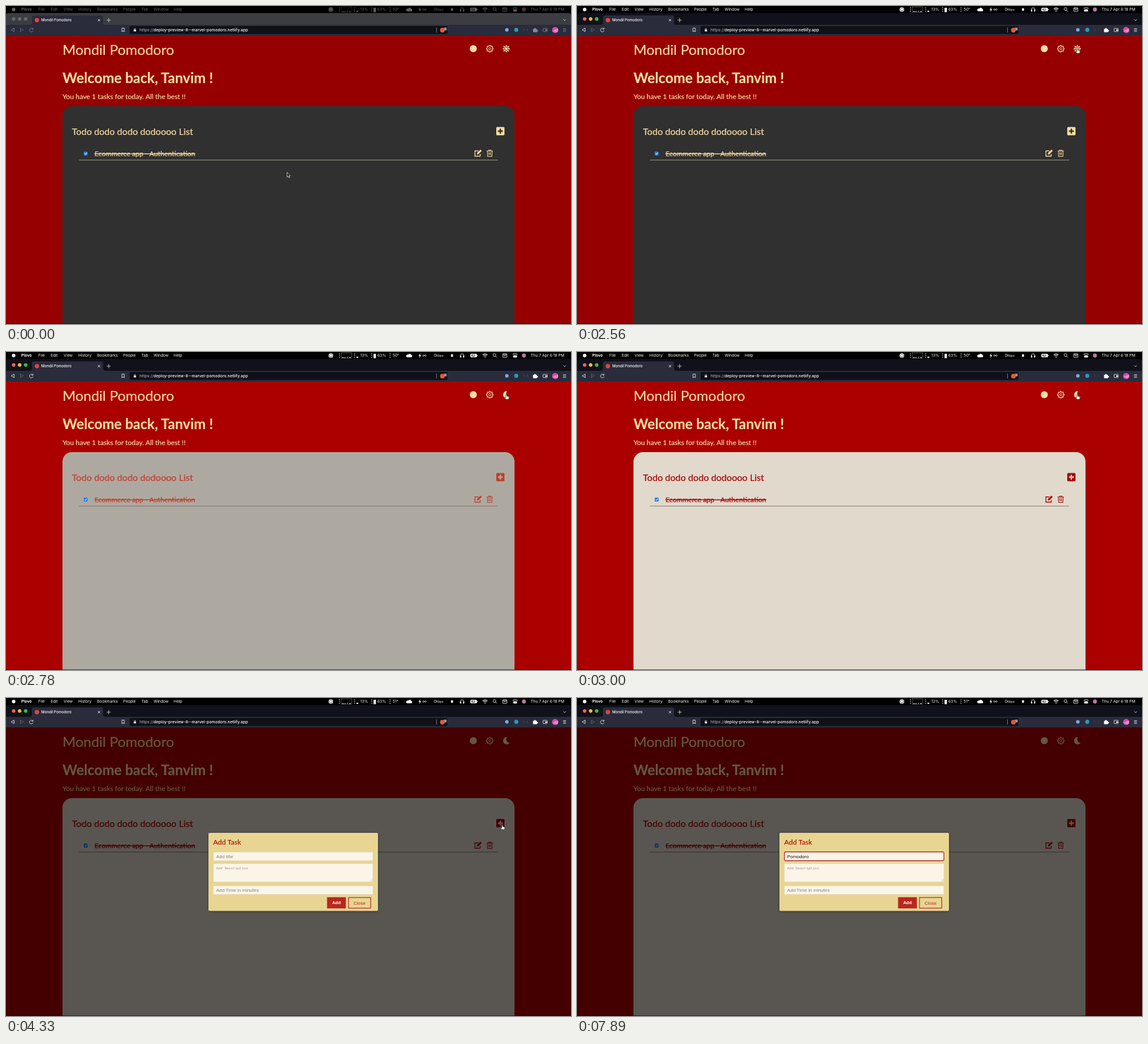
Recreate the animation shown at these times as an HTML page. Size 960 px wide and 540 px high, loop 8000 ms.

```html
<!DOCTYPE html>
<html lang="en">
<head>
<meta charset="utf-8">
<title>Todo list</title>
<style>
html, body { margin: 0; width: 100%; height: 100%; overflow: hidden; background: #000; }
svg { display: block; width: 100vw; height: 100vh; }
text { white-space: pre; }
.ui { font-family: Inter, sans-serif; }
.page { font-family: Lato, sans-serif; }
.form { font-family: "Liberation Sans", Arial, sans-serif; }
.gold { fill: #f8dca0; }
.goldline { fill: none; stroke: #f8dca0; }
.ink { fill: var(--ink); }
.inkline { fill: none; stroke: var(--ink); }
.gold text { stroke: #f8dca0; stroke-width: 0.2; }
text.ink { stroke: var(--ink); stroke-width: 0.2; }
</style>
</head>
<body>
<svg id="stage" viewBox="0 0 960 540"></svg>
<script>
const LOOP = 8000;
const stage = document.getElementById('stage');

// Markup helpers
const attrs = o => Object.entries(o).map(([k, v]) => ` ${k}="${v}"`).join('');
const text = (x, y, size, str, o = {}) =>
  `<text x="${x}" y="${y}" font-size="${size}"${attrs(o)}>${str}</text>`;
const rect = (x, y, width, height, o = {}) => `<rect${attrs({ x, y, width, height, ...o })}/>`;
const disc = (cx, cy, r, o = {}) => `<circle${attrs({ cx, cy, r, ...o })}/>`;
const path = (d, o = {}) => `<path${attrs({ d, ...o })}/>`;
const group = (body, o = {}) => `<g${attrs(o)}>${body}</g>`;
const line = { fill: 'none', stroke: '#fff', 'stroke-width': 0.8 };

function gear(cx, cy, outer, inner, teeth) {
  const pts = [];
  for (let i = 0; i < teeth; i++) {
    [[-0.34, inner], [-0.2, outer], [0.2, outer], [0.34, inner]].forEach(([off, r]) => {
      const a = (i + off) * 2 * Math.PI / teeth;
      pts.push(`${(cx + r * Math.sin(a)).toFixed(2)} ${(cy - r * Math.cos(a)).toFixed(2)}`);
    });
  }
  return 'M' + pts.join('L') + 'Z';
}

function menuBar() {
  const menus = [['File', 55], ['Edit', 76], ['View', 98], ['History', 123], ['Bookmarks', 155],
    ['People', 199], ['Tab', 230], ['Window', 251], ['Help', 285]];
  const meter = x => [2.5, 5.5, 8.5].map(y => rect(x, y, 1, 1.5)).join('');
  return disc(13, 6, 3) +
    text(26, 8.4, 6.6, 'Plovo', { 'font-weight': 700 }) +
    menus.map(([s, x]) => text(x, 8.4, 6.6, s)).join('') +
    disc(552, 6, 3.2, { ...line, 'stroke-width': 1.3 }) + disc(552, 6, 2.1) +
    meter(566) + rect(569.5, 1.5, 18, 9, { ...line, 'stroke-width': 0.5, opacity: 0.6 }) +
    path('M571 9.5h3m1 0h2m2-.5h2m2 .5h3', line) +
    meter(592) + rect(595.5, 8, 3, 2) + text(602, 8.4, 6.6, '12%', { id: 'cpu' }) +
    meter(621) + rect(624.5, 3, 4, 7.5) + text(631, 8.4, 6.6, '63%') +
    meter(652) + text(657, 8.4, 6.6, '50°', { id: 'temp' }) +
    path('M681.5 9h7a2 2 0 0 0 .3-3.9a3 3 0 0 0-5.6-.5a2.3 2.3 0 0 0-1.7 4.4z') +
    path('M704 2l-3 4.5h2l-1 3.8l3.6-4.8h-2.3z') +
    path('M711 6c-1.5-2.2-3-1.2-3 0s1.5 2.2 3 0s3-1.2 3 0s-1.5 2.2-3 0', line) +
    text(727, 8.2, 6.6, '0<tspan font-size="5">Kbps</tspan>') +
    rect(756, 4, 3.5, 4) +
    path('M772 8v-2a3 3 0 0 1 6 0v2', line) + rect(771.6, 6, 1.8, 3.5) + rect(776.6, 6, 1.8, 3.5) +
    rect(789, 3, 11, 6, { rx: 1.5 }) + rect(800.5, 5, 1, 2) +
    text(790.6, 8, 5, '62', { 'font-weight': 700, style: 'fill:#000' }) +
    path('M810 5a5.7 5.7 0 0 1 8 0M811.5 6.8a3.5 3.5 0 0 1 5 0', { ...line, 'stroke-width': 1.1 }) + disc(814, 8.6, 0.9) +
    disc(830, 5.2, 2.4, line) + path('M831.8 7l2.2 2.3', line) +
    rect(844, 2.8, 7, 6.5, { ...line, rx: 1 }) + path('M844 4.5h7M845.5 6.5h4', line) +
    rect(861.5, 2.8, 7, 2.7, { ...line, rx: 1.3 }) + rect(861.5, 6.5, 7, 2.7, { rx: 1.3 }) +
    disc(880, 6, 3.4, { fill: '#b878a8' }) +
    text(891.5, 8.4, 6.6, 'Thu 7 Apr 6:18 PM');
}

function browser() {
  const lights = ['#ff5f57', '#febc2e', '#28c840'];
  return rect(0, 12, 960, 40, { rx: 4, id: 'strip' }) +
    path('M40 32q4 0 4-4v-9q0-3 3-3h115q3 0 3 3v9q0 4 4 4z', { fill: '#2a2c3b' }) +
    rect(0, 32, 960, 18.5, { fill: '#2a2c3b' }) +
    group(lights.map((c, i) => disc(13 + i * 10.2, 22, 3, { fill: c })).join(''), { id: 'lights' }) +
    group(lights.map((c, i) => disc(13 + i * 10.2, 22, 3)).join(''), { id: 'greys', fill: '#66676c' }) +
    disc(52.5, 24, 3.7, { fill: '#e0443f' }) +
    text(60, 26.2, 6.1, 'Mondil Pomodoro', { fill: '#fff', 'font-weight': 500 }) +
    path('M156 22l4 4m0-4l-4 4', line) +
    path('M171 24h7m-3.5-3.5v7', { ...line, stroke: '#ddd' }) +
    path('M947 22.7l2.2 2.2l2.2-2.2', line) +
    group(path('M13.8 37.5l-5 3l5 3z', line) +
      path('M45.2 38.7a3.1 3.1 0 1 0 .8 2.8M46 37v2.3h-2.3', line), { class: 'chrome' }) +
    path('M24.5 37.5l5 3l-5 3z', { ...line, stroke: '#6b6d7a' }) +
    path('M197 37.5h4v6.3l-2-1.8l-2 1.8z', line) +
    rect(210, 34, 540, 13.5, { rx: 2, fill: '#0f1018' }) +
    rect(217, 40, 4, 3.2, { fill: '#ddd' }) + path('M218 40v-1a1 1 0 0 1 2 0v1', { ...line, stroke: '#ddd' }) +
    text(227, 43, 6.85, '<tspan fill="#a5a7b0">https://</tspan>deploy-preview-8--marvel-pomodoro.netlify.app', { fill: '#fff', 'font-weight': 500 }) +
    rect(731, 36.5, 0.7, 8.5, { fill: '#aaa' }) +
    disc(741.5, 41, 4, { fill: '#f0562b' }) + rect(743.5, 36.5, 5.5, 5, { rx: 1, fill: '#777b88' }) +
    text(745, 40.6, 4, '3', { fill: '#fff' }) +
    disc(851, 40.5, 3, { fill: '#7ba8e8' }) + disc(867, 40.5, 3.4, { fill: '#279bb8' }) +
    path('M881 39l-1.5 1.5l1.5 1.5m4-3l1.5 1.5l-1.5 1.5', { ...line, stroke: '#50525e' }) +
    group(path('M895.5 38.8h2a1.3 1.3 0 1 1 2.5 0h2v2a1.3 1.3 0 1 1 0 2.4v1.3h-6.5z', { fill: '#fff' }) +
      rect(912.5, 38, 7, 5.5, { ...line, rx: 1 }) + rect(916, 40, 3.5, 2, { fill: '#fff' }) +
      path('M946.5 38.5h5m-5 2.3h5m-5 2.3h5', line), { class: 'chrome' }) +
    disc(933, 40.7, 5.2, { fill: '#d34bb0' }) +
    path('M928.2 42.5l9.2-4.2a5.2 5.2 0 0 1-1 6.5z', { fill: '#f08ac0' });
}

function page() {
  return rect(0, 50, 960, 490, { id: 'back' }) +
    group(
      text(96, 82.5, 24, 'Mondil Pomodoro') +
      text(96, 131, 24, 'Welcome back, Tanvim !', { 'font-weight': 700 }) +
      text(96, 158, 11.8, 'You have 1 tasks for today. All the best !!') +
      disc(794, 72.5, 6), { class: 'gold' }) +
    path(gear(822, 72.5, 5.7, 4.3, 8), { class: 'goldline', 'stroke-width': 1.1, 'stroke-linejoin': 'round' }) +
    disc(822, 72.5, 1.8, { class: 'goldline' }) +
    group(path(gear(850, 72.5, 6.2, 4, 8)) +
      disc(850, 72.5, 2.9, { fill: 'none', stroke: '#970000', 'stroke-width': 0.9 }), { class: 'gold', id: 'sun' }) +
    path('M851.5 66.7a6 6 0 1 0 4.2 9.3a5.5 5.5 0 0 1-4.2-9.3z', { class: 'gold', id: 'moon' }) +
    path('M96 540V186a16 16 0 0 1 16-16H848a16 16 0 0 1 16 16V540z', { id: 'card' }) +
    text(112, 218.5, 15.6, 'Todo dodo dodo dodoooo List', { class: 'ink' }) +
    rect(833, 205.5, 14, 14, { rx: 1.5, class: 'ink' }) +
    path('M840 208.3v8.4m-4.2-4.2h8.4', { id: 'plus', 'stroke-width': 2.4 }) +
    rect(132, 247.3, 6.6, 6.6, { rx: 1.1, fill: '#2b7de9' }) +
    path('M133.5 250.7l1.4 1.5l2.4-3.2', { ...line, 'stroke-width': 1 }) +
    text(150.5, 255, 11.9, 'Ecommerce app - Authentication', { class: 'ink', 'text-decoration': 'line-through' }) +
    path('M802.5 246h-5.8v9h9v-3.7', { class: 'inkline', 'stroke-width': 1.3, 'stroke-linejoin': 'round' }) +
    path('M800 252.3l.4-2.7l5.2-5.2q.7-.6 1.4 0l.8.8q.6.7 0 1.4l-5.2 5.2z', { class: 'ink' }) +
    path('M816.7 246.3h10.6m-7.3 0v-1.6h4v1.6m-6 0l.4 9.2h7.2l.4-9.2m-5.2 2v5m2.4-5v5', { class: 'inkline', 'stroke-width': 1.1 }) +
    rect(124, 261.3, 712, 0.8, { id: 'rule' });
}

function modal() {
  const field = (y, h) => rect(352.3, y, 271, h, { rx: 1, fill: '#faf5e8', stroke: '#ddd6c2', 'stroke-width': 0.6 });
  const hint = { fill: '#85827b', class: 'form' };
  return rect(0, 50, 960, 490, { fill: '#000', opacity: 0.6 }) +
    rect(344, 229, 288, 132.5, { rx: 2, fill: '#e8d592', filter: 'url(#soft)' }) +
    text(352, 249, 12, 'Add Task', { fill: '#aa0000', class: 'page', 'font-weight': 500 }) +
    field(261.8, 14.4) + field(281.3, 31) + field(319, 14.6) +
    rect(352.4, 261.4, 271, 15, { rx: 1.8, fill: 'none', stroke: '#a80f1c', 'stroke-width': 1.1, id: 'focus' }) +
    text(357, 271.5, 8, 'Add title', { ...hint, id: 'title' }) +
    rect(357, 264, 0.8, 9.5, { id: 'caret', fill: '#111' }) +
    text(357, 290.7, 6, 'Add Description', { fill: '#96928a', 'font-family': "'Liberation Mono', monospace" }) +
    path('M619 311.5l3.7-3.7m-1.7 3.7l1.7-1.7', { ...line, stroke: '#999', 'stroke-width': 0.5 }) +
    text(357, 329, 8, 'Add Time in minutes', hint) +
    rect(545.5, 338.3, 32, 19, { fill: '#b9271d' }) +
    text(561.5, 350.3, 7.5, 'Add', { fill: '#fff', class: 'form', 'font-weight': 700, 'text-anchor': 'middle' }) +
    rect(582, 338.8, 37.6, 18, { fill: 'none', stroke: '#b9271d', 'stroke-width': 1.2 }) +
    text(600.7, 350.5, 8, 'Close', { fill: '#b9271d', class: 'form', 'text-anchor': 'middle' });
}

function pointer() {
  return disc(0, 0, 14.5, { id: 'ring', fill: 'none', stroke: '#111', 'stroke-width': 1.6 }) +
    group(
      path('M0 0v8l1.9-1.7l1.3 2.9l1.3-.6l-1.3-2.8h2.5z', { id: 'arrow', fill: '#111', stroke: '#fff', 'stroke-width': 0.7 }) +
      path('M-.8-3.5a.8.8 0 0 1 1.6 0v2.7q1.3-.3 1.4.5q1.2-.2 1.3.6q1.1 0 1 1.2l-.6 3h-4.4l-2.3-3.2q.3-1.2 2 .2z', { id: 'hand', fill: '#fff', stroke: '#111', 'stroke-width': 0.6 }) +
      path('M-1.5-4q1.5 0 1.5 1v6q0 1-1.5 1m3-8q-1.5 0-1.5 1m0 6q0 1 1.5 1', { id: 'beam', fill: 'none', stroke: '#111', 'stroke-width': 0.7 }),
      { id: 'pointer' });
}

stage.innerHTML =
  '<defs><filter id="soft" x="-5%" y="-10%" width="110%" height="120%">' +
  '<feDropShadow dx="0" dy="1" stdDeviation="2" flood-opacity=".35"/></filter></defs>' +
  rect(0, 0, 960, 540, { fill: '#000' }) +
  group(menuBar(), { id: 'menu', class: 'ui', fill: '#fff' }) +
  group(browser(), { class: 'ui' }) +
  group(page(), { class: 'page' }) +
  group(modal(), { id: 'modal' }) +
  pointer() +
  rect(0, 539.3, 960, 0.7, { fill: '#111' });

const $ = Object.fromEntries([...stage.querySelectorAll('[id]')].map(e => [e.id, e]));
const chrome = stage.querySelectorAll('.chrome');

const clamp = v => Math.min(1, Math.max(0, v));
const ramp = (t, a, b) => clamp((t - a) / (b - a));
const ease = u => u * u * (3 - 2 * u);
const mix = (a, b, u) => `rgb(${a.map((v, i) => Math.round(v + (b[i] - v) * u))})`;
const show = (el, on) => el.setAttribute('display', on ? 'inline' : 'none');
const within = (t, a, b) => t >= a && t < b;

// Pointer legs: start, end, from, to
const legs = [
  [800, 2200, [477.5, 282.5], [850, 76]],
  [3300, 4050, [850, 76], [843, 219]],
  [4400, 4950, [843, 219], [470, 269]]
];
const THEME = 2670, OPEN = 4330, FOCUS = 5220;
const keys = [6110, 6330, 6640, 6770, 6990, 7100, 7210, 7380];
const word = 'Pomodoro';

function pointerAt(t) {
  let pos = legs[0][2];
  for (const [a, b, from, to] of legs) {
    if (t < a) break;
    const u = ease(ramp(t, a, b));
    pos = from.map((v, i) => v + (to[i] - v) * u);
  }
  return pos;
}

function draw(t) {
  const wake = ramp(t, 60, 330);
  $.menu.setAttribute('opacity', 0.38 + 0.62 * wake);
  $.lights.setAttribute('opacity', wake);
  $.greys.setAttribute('opacity', 1 - wake);
  chrome.forEach(e => e.setAttribute('opacity', 0.45 + 0.55 * wake));
  $.strip.setAttribute('fill', mix([60, 61, 66], [16, 17, 26], wake));
  $.cpu.textContent = within(t, 1000, 4800) ? '13%' : '12%';
  $.temp.textContent = t < 3550 ? '50°' : '51°';

  const light = t >= THEME + 30;
  const u = ease(ramp(t, THEME + 20, THEME + 160));
  const cardFill = mix([48, 48, 48], [224, 217, 204], u);
  $.back.setAttribute('fill', light ? '#aa0000' : '#970000');
  $.card.setAttribute('fill', cardFill);
  $.plus.setAttribute('stroke', cardFill);
  $.rule.setAttribute('fill', light ? '#6e665e' : '#b8b2a0');
  stage.style.setProperty('--ink', mix([248, 220, 160], [170, 0, 0], u));
  show($.sun, !light);
  show($.moon, light);

  show($.modal, t >= OPEN);
  const pressed = keys.filter(k => t >= k);
  const typed = word.slice(0, pressed.length);
  const last = Math.max(FOCUS + 110, ...pressed);
  $.title.textContent = typed || 'Add title';
  $.title.setAttribute('fill', typed ? '#111' : '#85827b');
  show($.focus, t >= FOCUS);
  show($.caret, t >= FOCUS && (t < last || Math.floor((t - last) / 505) % 2 === 0));
  if (t >= FOCUS) $.caret.setAttribute('x', 357 + (typed ? $.title.getComputedTextLength() : 0));

  const [x, y] = pointerAt(t);
  $.pointer.setAttribute('transform', `translate(${x} ${y})`);
  show($.pointer, !typed);
  const hand = within(t, 2120, 3380) || within(t, 3960, 4440);
  const beam = t >= 4850;
  show($.hand, hand);
  show($.beam, beam);
  show($.arrow, !hand && !beam);
  show($.ring, [THEME, 4220, FOCUS].some(c => within(t, c, c + 110)));
  $.ring.setAttribute('transform', `translate(${x - 0.5} ${y - 3})`);
}

const start = performance.now();
function frame() {
  draw((performance.now() - start) % LOOP);
  requestAnimationFrame(frame);
}
draw(0);
requestAnimationFrame(frame);
</script>
</body>
</html>
```
